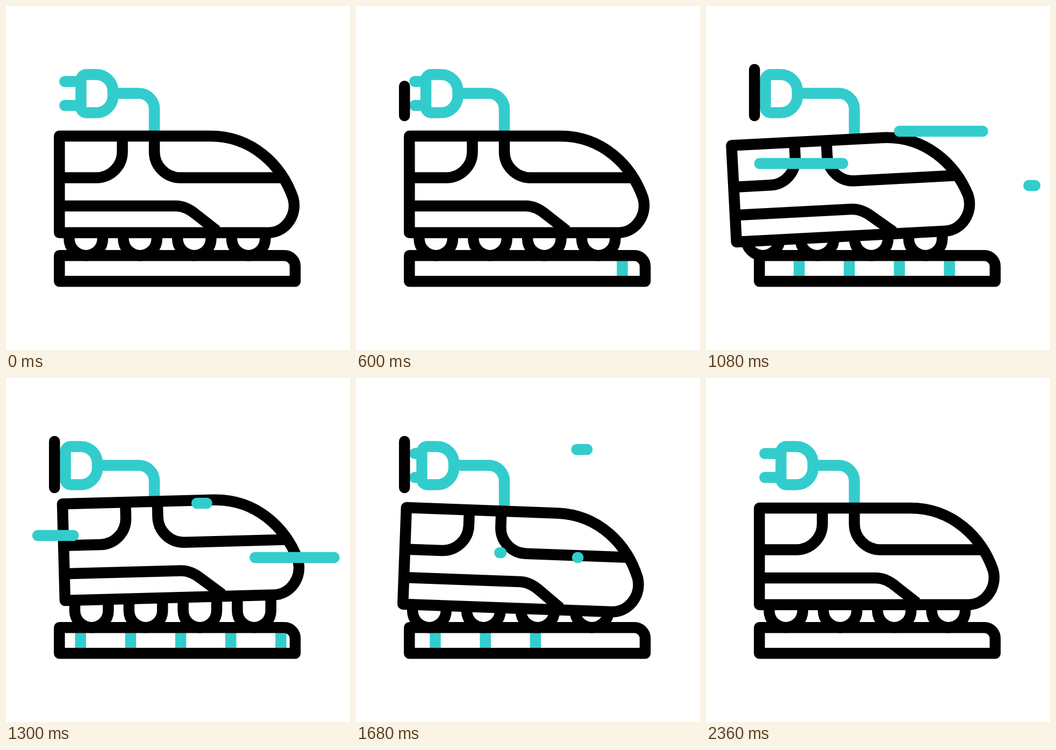
Animation, 640 px wide and 640 px high, one loop 2400 ms. Source, as an HTML page with a canvas:

```html
<!DOCTYPE html>
<html lang="en">
<head>
<meta charset="utf-8">
<title>Electric train</title>
<style>
html, body { margin: 0; width: 100%; height: 100%; overflow: hidden; background: #fff; }
canvas { display: block; }
</style>
</head>
<body>
<canvas id="stage" width="640" height="640"></canvas>
<script>
const ctx = document.getElementById('stage').getContext('2d');
const LOOP = 2400, TEAL = '#33cccc', BLACK = '#000', WEIGHT = 20.5;

const shell = new Path2D('M99.3 242H380C459 242 513 297 534 357C543 390 519 421.7 488 421.7H99.3Z');
const trim = new Path2D('M216.5 242V271A48.5 48.5 0 0 1 168 319.5H99.3M276 242V271A48.5 48.5 0 0 0 324.5 319.5H514M99.3 372H316C330 372 343 379 353.7 388L392 418');
const wheel = new Path2D('M117.5 412V433a31.2 31.2 0 0 0 62.4 0V412');
const track = new Path2D('M99.3 464.3H518a20 20 0 0 1 20 20V512.3H99.3Z');
const plugBody = new Path2D('M149.5 127.5H168a31 31 0 0 1 31 31v9a31 31 0 0 1-31 31h-18.5a10 10 0 0 1-10-10V137.5a10 10 0 0 1 10-10z');

// Keyframes are [time, value]
const plugKeys = [[0, 0], [400, 24.5], [740, -29], [1540, -29], [2000, 24.5], [2370, 0]];
const shiftKeys = [[600, 0], [1060, -43.5], [1440, 34], [1840, -37], [2270, 0]];
const tiltKeys = [[600, 0], [1060, -3], [1760, 2.3], [2270, 0]];
const bounceKeys = [[600, 0], [1070, 6], [1310, -13.7], [1680, 7], [2000, -8.4], [2290, 0]];
const sleeperKeys = [[480, 560], [600, 486], [1080, 70.8], [1300, -150.2], [1680, -514.4], [2000, -706.8], [2200, -770]];

// Speed lines: right end, y, start time
const speedLines = [[555, 233, 700], [259, 293, 783], [612, 334, 1020], [430, 133, 1600], [270, 325, 1652]];

function ease(t, start, end) {
  const u = Math.min(1, Math.max(0, (t - start) / (end - start)));
  return u * u * (3 - 2 * u);
}

function eased(keys, t) {
  let value = keys[0][1];
  for (let i = 1; i < keys.length; i++)
    value += (keys[i][1] - keys[i - 1][1]) * ease(t, keys[i - 1][0], keys[i][0]);
  return value;
}

function spline(keys, t) {
  const last = keys.length - 1;
  if (t <= keys[0][0]) return keys[0][1];
  if (t >= keys[last][0]) return keys[last][1];
  const i = keys.findIndex(k => k[0] > t) - 1;
  const slope = n => {
    const a = keys[Math.max(0, n - 1)], b = keys[Math.min(last, n + 1)];
    return (b[1] - a[1]) / (b[0] - a[0]);
  };
  const span = keys[i + 1][0] - keys[i][0], u = (t - keys[i][0]) / span;
  const blend = u * u * (3 - 2 * u);
  return keys[i][1] * (1 - blend) + keys[i + 1][1] * blend
    + span * u * (1 - u) * (slope(i) * (1 - u) - slope(i + 1) * u);
}

function stroke(path, color) {
  ctx.strokeStyle = color;
  ctx.stroke(path);
}

function line(x1, y1, x2, y2, color) {
  const path = new Path2D();
  path.moveTo(x1, y1);
  path.lineTo(x2, y2);
  stroke(path, color);
}

function shifted(x, y, paint) {
  ctx.save();
  ctx.translate(x, y);
  paint();
  ctx.restore();
}

function drawPlug(t) {
  const dx = eased(plugKeys, t);
  const tip = 109.3 + Math.max(0, dx);
  for (const y of [140.5, 185]) line(tip, y, Math.max(tip, 139 + dx), y, TEAL);
  stroke(new Path2D(`M${199 + dx} 162.5H247a29 29 0 0 1 29 29V262`), TEAL);
  shifted(dx, 0, () => stroke(plugBody, TEAL));
}

function drawWall(t) {
  const top = 204 - 86 * ease(t, 400, 740);
  const bottom = 204 - 86 * ease(t, 1940, 2360);
  if (bottom - top > 0.1) line(90.2, top, 90.2, bottom, BLACK);
}

function drawTrack(t) {
  const first = spline(sleeperKeys, t);
  ctx.fillStyle = TEAL;
  for (let i = 0; i < 10; i++) {
    const x = first + i * 93.2;
    if (x > 85 && x < 530) ctx.fillRect(x, 470, WEIGHT, 36);
  }
  stroke(track, BLACK);
}

function drawTrain(t) {
  const dx = eased(shiftKeys, t);
  for (let i = 0; i < 4; i++) shifted(dx + i * 100.8, 0, () => stroke(wheel, BLACK));
  shifted(318 + dx, 422 + eased(bounceKeys, t), () => {
    ctx.rotate(eased(tiltKeys, t) * Math.PI / 180);
    ctx.translate(-318, -422);
    ctx.fillStyle = '#fff';
    ctx.fill(shell);
    ctx.lineCap = 'butt';
    stroke(trim, BLACK);
    stroke(shell, BLACK);
  });
}

function drawSpeedLines(t) {
  for (const [x, y, start] of speedLines) {
    const head = 200 * ease(t, start, start + 420);
    const tail = 200 * ease(t, start + 260, start + 680);
    if (head - tail > 0.1) line(x - head, y, x - tail, y, TEAL);
  }
}

function draw(now) {
  const t = now % LOOP;
  ctx.fillStyle = '#fff';
  ctx.fillRect(0, 0, 640, 640);
  ctx.lineWidth = WEIGHT;
  ctx.lineCap = ctx.lineJoin = 'round';
  drawPlug(t);
  drawWall(t);
  drawTrack(t);
  drawTrain(t);
  drawSpeedLines(t);
}

const begin = performance.now();
function tick() {
  draw(performance.now() - begin);
  requestAnimationFrame(tick);
}
tick();
</script>
</body>
</html>
```
